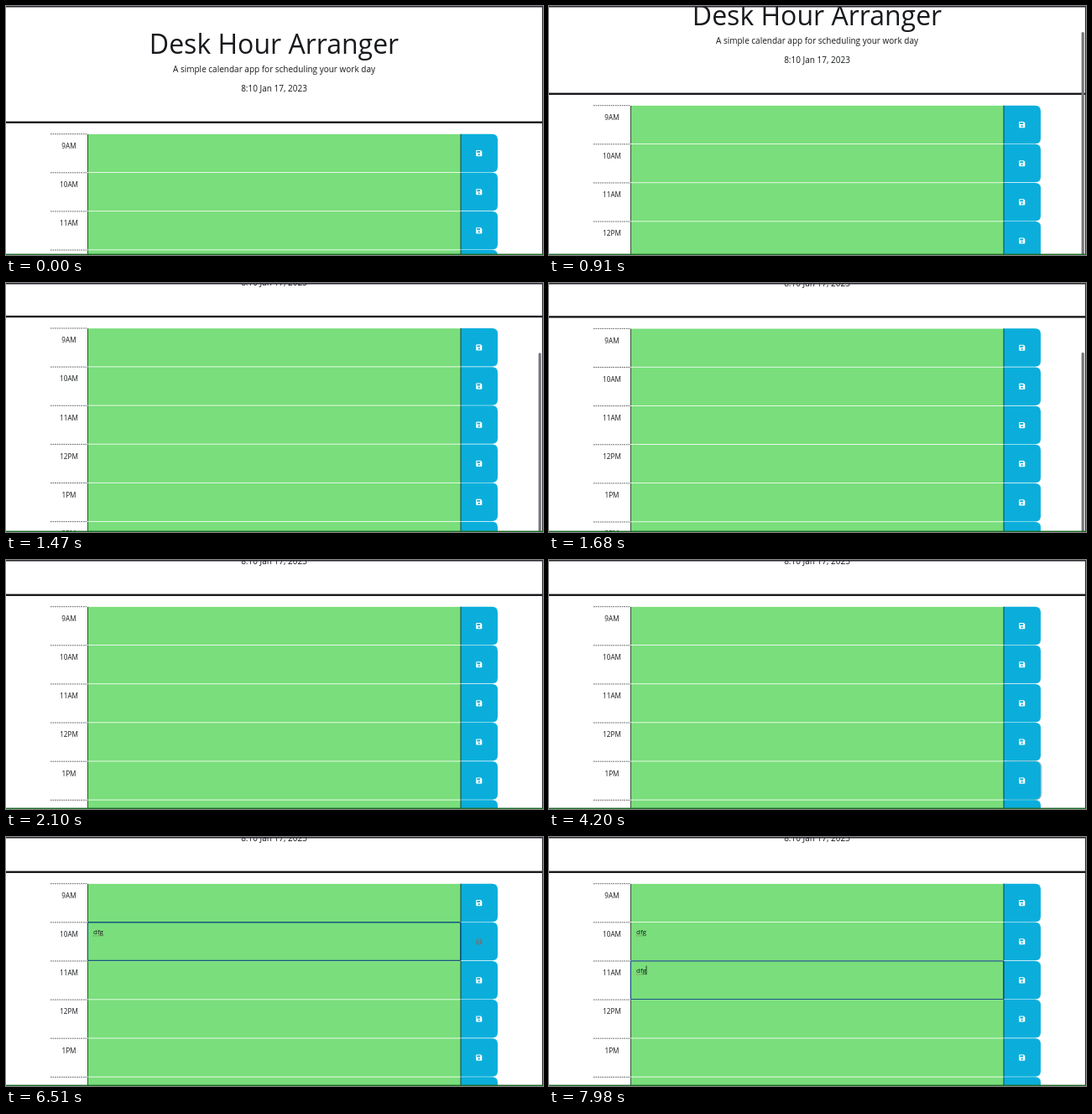
These frames come from a looping animation (640 px wide and 297 px high, 8 s). An HTML page:

```html
<!DOCTYPE html>
<html lang="en">
<head>
<meta charset="utf-8">
<title>Day planner</title>
<style>
html, body { margin: 0; width: 100%; height: 100%; overflow: hidden; background: #fff; }
svg { display: block; width: 640px; height: 297px; font-family: "Open Sans", "Noto Sans", sans-serif; fill: #17191c; }
.mid { text-anchor: middle; }
</style>
</head>
<body>
<svg id="stage" viewBox="0 0 640 297">
  <rect width="640" height="297" fill="#fff"/>
  <g id="page">
    <text class="mid" x="319.5" y="56.5" font-size="32">Desk Hour Arranger</text>
    <text class="mid" x="319.5" y="79" font-size="10">A simple calendar app for scheduling your work day</text>
    <text class="mid" x="319.5" y="102" font-size="10">8:10 Jan 17, 2023</text>
    <rect y="137.6" width="640" height="2.3" fill="#101014"/>
    <g id="rows"></g>
  </g>
  <rect id="thumb" x="634.6" width="3.2" height="330" rx="1.6" fill="#77777a"/>
  <rect width="640" height="1.5" fill="#29272d"/>
  <rect x="638.9" width="1.1" height="297" fill="#303036"/>
  <rect y="295.6" width="640" height="1.4" fill="#1d6a26"/>
</svg>
<script>
const LOOP = 8000, STEP = 70, TOP = 152.4, PITCH = 46.13;
const GREEN = "#79de7b", BLUE = "#0baedb";
const scrollKeys = [[770, 0], [840, 12], [910, 34], [980, 54], [1050, 70], [1190, 89],
  [1330, 96.5], [1470, 98.7], [1610, 98.7], [1820, 97.6], [2100, 97]];

function add(parent, tag, attrs, text) {
  const el = document.createElementNS("http://www.w3.org/2000/svg", tag);
  for (const key in attrs) el.setAttribute(key, attrs[key]);
  if (text) el.textContent = text;
  parent.appendChild(el);
  return el;
}

function makeRow(label, i) {
  const g = add(document.getElementById("rows"), "g", { transform: `translate(0 ${TOP + i * PITCH})` });
  add(g, "path", { d: "M53 .3H97", stroke: "#333", "stroke-width": .8, "stroke-dasharray": "1.6 1" });
  add(g, "text", { class: "mid", x: 75, y: 17.6, "font-size": 8.2 }, label);
  add(g, "rect", { x: 97, y: .5, width: 445, height: 45.3, fill: GREEN });
  add(g, "path", { d: "M97.5 .5V45.8", stroke: "#25432a", "stroke-width": .9 });
  const shadow = add(g, "rect", { x: 541, y: -.4, width: 46.6, height: 47, rx: 7.5, fill: "#8fa3ad" });
  add(g, "path", { d: "M542 .3H579.5Q586 .3 586 6.8V39.3Q586 45.8 579.5 45.8H542Z", fill: BLUE });
  add(g, "path", { d: "M542 .3V45.8", stroke: "#123c4c", "stroke-width": 1 });
  const icon = add(g, "path", {
    d: "M561 19.6H565.8L567.3 21.1V26Q567.3 26.8 566.5 26.8H561Q560.2 26.8 560.2 26V20.4Q560.2 19.6 561 19.6Z" +
       "M561.3 20.7V22.6H565.2V20.7ZM563.7 23.6A1.1 1.1 0 1 0 563.71 23.6Z",
    "fill-rule": "evenodd"
  });
  const ring = add(g, "rect", { x: 97.4, y: .2, width: 444.3, height: 45.7, rx: .8, fill: "none", stroke: "#14577f", "stroke-width": 1.3 });
  const note = add(g, "text", { x: 104, y: 14.2, "font-size": 8 });
  const wavy = add(g, "path", { d: "M104 16.3H116", stroke: "#8a6a4c", "stroke-width": .9, "stroke-dasharray": "1 1" });
  const caret = add(g, "path", { d: "M116 6V16.5", stroke: "#111", "stroke-width": .8 });
  return { shadow, icon, ring, note, wavy, caret };
}

const labels = ["9AM", "10AM", "11AM", "12PM", "1PM", "2PM", "3PM", "4PM", "5PM"];
const rows = labels.map(makeRow);
const page = document.getElementById("page");
const thumb = document.getElementById("thumb");

// focus window, then the time of each keystroke
const entries = {
  1: { from: 4900, to: 6720, keys: [5460, 5600, 5740] },
  2: { from: 7140, to: LOOP, keys: [7420, 7560, 7700] }
};

const clamp = v => Math.max(0, Math.min(1, v));
const pulse = (t, a, b) => clamp((t - a) / 140) * clamp((b - t) / 140);
const show = (el, on) => el.setAttribute("opacity", +on);

function scrollAt(t) {
  for (let i = 1; i < scrollKeys.length; i++) {
    const [t0, y0] = scrollKeys[i - 1], [t1, y1] = scrollKeys[i];
    if (t < t1) return y0 + (y1 - y0) * clamp((t - t0) / (t1 - t0));
  }
  return 97;
}

function mixIcon(k) {
  const c = [[255, 96], [255, 125], [255, 137]].map(([a, b]) => Math.round(a + (b - a) * k));
  return `rgb(${c})`;
}

function draw(t) {
  const y = scrollAt(t);
  page.setAttribute("transform", `translate(0 ${-y})`);
  thumb.setAttribute("y", 3.6 + .806 * y);
  show(thumb, t < 840 ? 0 : clamp((2030 - t) / 210));
  rows.forEach((r, i) => {
    const e = entries[i];
    const focus = !!e && t >= e.from && t < e.to;
    const count = e ? e.keys.filter(k => t >= k).length : 0;
    r.note.textContent = "dfg".slice(0, count);
    r.caret.setAttribute("transform", `translate(${[-11.6, -6.7, -4.2, 0][count]} 0)`);
    show(r.ring, focus);
    show(r.caret, focus && (t - (count ? e.keys[count - 1] : e.from)) % 1000 < 560);
    show(r.wavy, count === 3);
    show(r.shadow, i === 4 ? .6 * pulse(t, 3990, 4480) : i === 1 ? .6 * pulse(t, 6720, 7210) : 0);
    r.icon.setAttribute("fill", mixIcon(i === 1 ? pulse(t, 6300, 7070) : 0));
  });
}

function tick(now) {
  const t = now % LOOP;
  draw(Math.floor(t / STEP) * STEP);
  requestAnimationFrame(tick);
}
draw(0);
requestAnimationFrame(tick);
</script>
</body>
</html>
```
